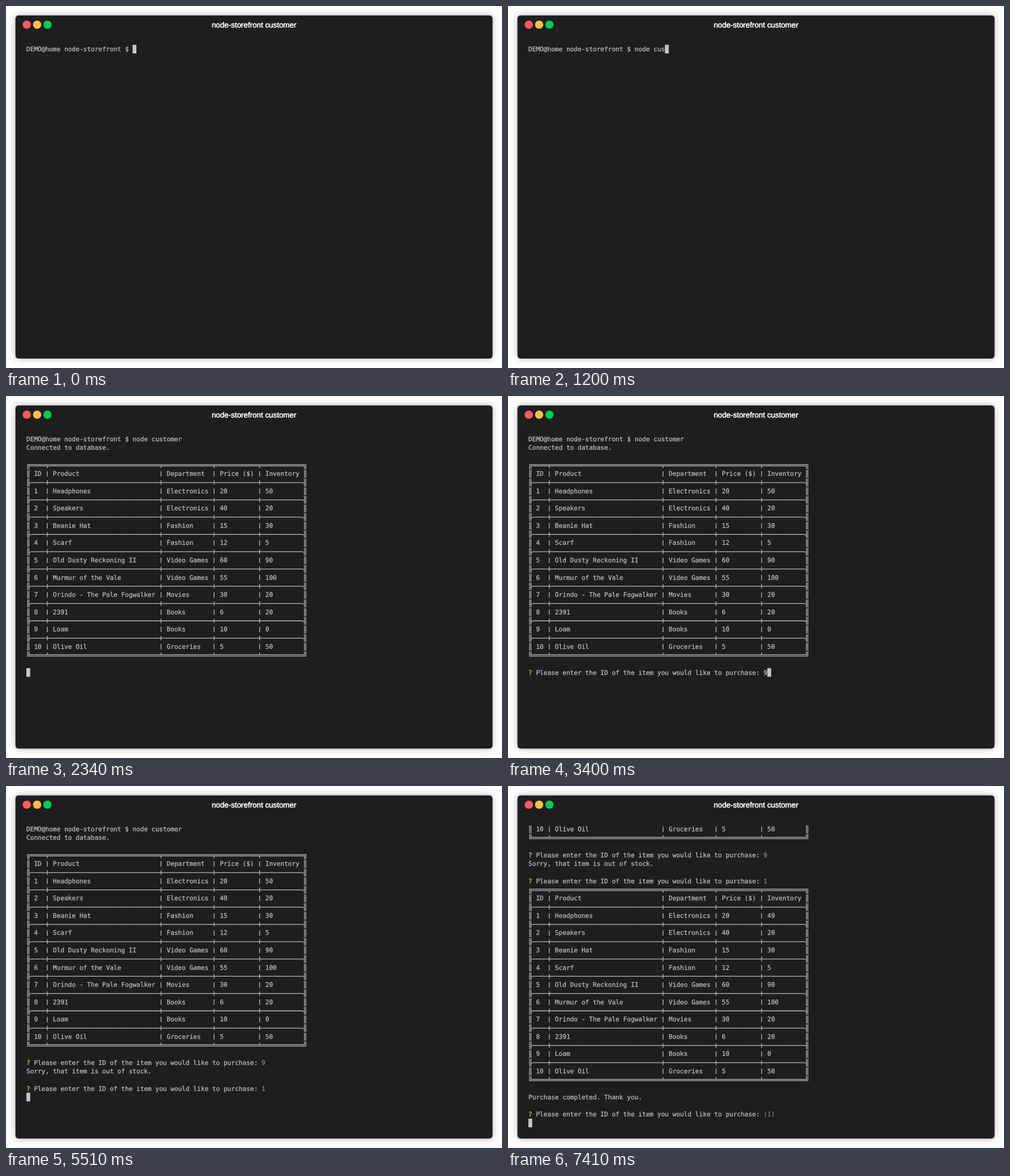
An HTML page for the animation above (7430 ms loop, 875 px wide and 640 px high).

```html
<!DOCTYPE html>
<html lang="en">
<head>
<meta charset="utf-8">
<title>node-storefront customer</title>
<style>
  html, body { margin: 0; width: 100%; height: 100%; overflow: hidden; background: #fff; }
  .window {
    position: absolute; left: 17px; top: 17px; width: 841px; height: 606px;
    border-radius: 5px; background: #1e1e1e;
    box-shadow: 0 0 0 1px rgba(30, 30, 30, .35), 0 0 13px rgba(0, 0, 0, .3);
  }
  svg { position: absolute; left: 0; top: 0; }
  text { text-rendering: geometricPrecision; }
  .title {
    font: 13.36px "Liberation Sans", Arial, sans-serif;
    fill: #fff; stroke: #fff; stroke-width: .55px; text-anchor: middle;
  }
  #screen text {
    font: 11.12px "DejaVu Sans Mono", monospace;
    fill: #bababa; stroke: #bababa; stroke-width: .3px;
  }
  #screen .mark { fill: #b9d83f; stroke: #b9d83f; }
  #screen .dim { fill: #7c7c7c; stroke: #7c7c7c; }
  #screen .answer { fill: #82888c; stroke: #82888c; }
  #screen path { fill: none; stroke: #bababa; stroke-width: 1.3px; }
  #screen rect { fill: #c7c7c7; }
</style>
</head>
<body>
<div class="window"></div>
<svg width="875" height="640" viewBox="0 0 875 640">
  <circle cx="36.7" cy="33" r="7.3" fill="#ff5c5c"/>
  <circle cx="54.9" cy="33" r="7.3" fill="#ffbd4c"/>
  <circle cx="73.1" cy="33" r="7.3" fill="#00ca56"/>
  <text class="title" x="437.5" y="38">node-storefront customer</text>
  <g id="screen"></g>
</svg>
<script>
const LOOP = 7430;
const LEFT = 36, TOP = 68.6, CELL = 6.69, ROW = 15.28;
const SVG = "http://www.w3.org/2000/svg";
const screen = document.getElementById("screen");

// ---- terminal content: a line is a list of [text, class] runs ----
const plain = s => [[s, ""]];
const blank = plain("");
const shell = typed => plain("DEMO@home node-storefront $ " + typed);
const ask = (s, cls) => [
  ["? ", "mark"],
  ["Please enter the ID of the item you would like to purchase: ", ""],
  [s, cls]
];

const widths = [4, 29, 13, 11, 11];
const items = [
  ["Headphones", "Electronics", 20, 50],
  ["Speakers", "Electronics", 40, 20],
  ["Beanie Hat", "Fashion", 15, 30],
  ["Scarf", "Fashion", 12, 5],
  ["Old Dusty Reckoning II", "Video Games", 60, 90],
  ["Murmur of the Vale", "Video Games", 55, 100],
  ["Orindo - The Pale Fogwalker", "Movies", 30, 20],
  ["2391", "Books", 6, 20],
  ["Loam", "Books", 10, 0],
  ["Olive Oil", "Groceries", 5, 50]
];

function table(sold) {
  const rule = (l, fill, join, r) => plain(l + widths.map(w => fill.repeat(w)).join(join) + r);
  const row = cells => plain("║" + cells.map((c, i) => (" " + c).padEnd(widths[i])).join("│") + "║");
  const lines = [rule("╔", "═", "╤", "╗"), row(["ID", "Product", "Department", "Price ($)", "Inventory"])];
  items.forEach(([name, dept, price, stock], i) => {
    const left = i === 0 ? stock - sold : stock;
    lines.push(rule("╟", "─", "┼", "╢"), row([i + 1, name, dept, price, left]));
  });
  return [...lines, rule("╚", "═", "╧", "╝")];
}

const opened = [shell("node customer"), plain("Connected to database.")];
const listed = [...opened, blank, ...table(0), blank];
const refused = [...listed, ask("9", "answer"), plain("Sorry, that item is out of stock."), blank];
const bought = [...refused, ask("1", "answer")];
const thanked = [...bought, ...table(1), blank, plain("Purchase completed. Thank you."), blank];

// ---- steps: [start time, lines, scrolled rows]; the cursor ends the last line ----
const steps = [[0, [shell("")], 0]];
[..."node customer"].forEach((_, i) =>
  steps.push([500 + i * 100, [shell("node customer".slice(0, i + 1))], 0]));
steps.push(
  [1800, [shell("node customer"), blank], 0],
  [2240, [...opened, blank], 0],
  [2340, [...listed, blank], 0],
  [2360, [...listed, ask("(1) ", "dim")], 0],
  [3400, [...listed, ask("9", "")], 0],
  [3830, [...listed, ask("9", "answer"), blank], 0],
  [3930, [...refused, ask("(1) ", "dim")], 0],
  [5130, [...refused, ask("1", "")], 0],
  [5510, [...bought, blank], 0],
  [5610, [...thanked, ask("(1) ", "dim")], 23],
  [7410, [...thanked, ask("(1) ", "dim"), blank], 24]
);

// ---- drawing ----
function add(tag, attrs, content = "") {
  const el = document.createElementNS(SVG, tag);
  for (const k in attrs) el.setAttribute(k, attrs[k]);
  el.textContent = content;
  screen.append(el);
}

// Path of one box-drawing character in a cell centred on (x, y).
function box(ch, x, y) {
  const h = CELL / 2, d = 1.2, tall = 6.9, bar = 4.8, tick = 4;
  const hor = (dy, a, b) => `M${x + a} ${y + dy}H${x + b}`;
  const ver = (dx, a, b) => `M${x + dx} ${y + a}V${y + b}`;
  const pair = hor(-d, -h, h) + hor(d, -h, h);
  const posts = ver(-d, -tall, tall) + ver(d, -tall, tall);
  const corner = (sx, sy) =>
    `M${x + sx * h} ${y - sy * d}H${x - sx * d}V${y + sy * tall}` +
    `M${x + sx * h} ${y + sy * d}H${x + sx * d}V${y + sy * tall}`;
  switch (ch) {
    case "═": return pair;
    case "─": return hor(0, -h, h);
    case "│": return ver(0, -bar, bar);
    case "║": return posts;
    case "┼": return hor(0, -h, h) + ver(0, -tick, tick);
    case "╤": return pair + ver(0, d, tick + 1);
    case "╧": return pair + ver(0, -tick - 1, -d);
    case "╟": return posts + hor(1.5, d, h);
    case "╢": return posts + hor(1.5, -h, -d);
    case "╔": return corner(1, 1);
    case "╗": return corner(-1, 1);
    case "╚": return corner(1, -1);
    case "╝": return corner(-1, -1);
  }
}

function drawLine(line, top) {
  let col = 0, path = "";
  for (const [s, cls] of line) {
    for (const m of s.matchAll(/[\u2500-\u257f]|[^\s\u2500-\u257f]+/g)) {
      const x = LEFT + (col + m.index) * CELL;
      if (/[\u2500-\u257f]/.test(m[0])) path += box(m[0], x + CELL / 2, top + ROW / 2 + .4);
      else add("text", { x, y: top + 11.5, class: cls }, m[0]);
    }
    col += s.length;
  }
  if (path) add("path", { d: path });
  return col;
}

function draw([, lines, scroll]) {
  screen.textContent = "";
  let col = 0;
  lines.slice(scroll).forEach((line, r) => { col = drawLine(line, TOP + r * ROW); });
  const last = lines.length - scroll - 1;
  add("rect", { x: LEFT + col * CELL, y: TOP + last * ROW, width: CELL, height: ROW });
}

let shown = null;
function tick() {
  const t = performance.now() % LOOP;
  const step = steps.findLast(s => s[0] <= t);
  if (step !== shown) draw(shown = step);
  requestAnimationFrame(tick);
}
tick();
</script>
</body>
</html>
```
